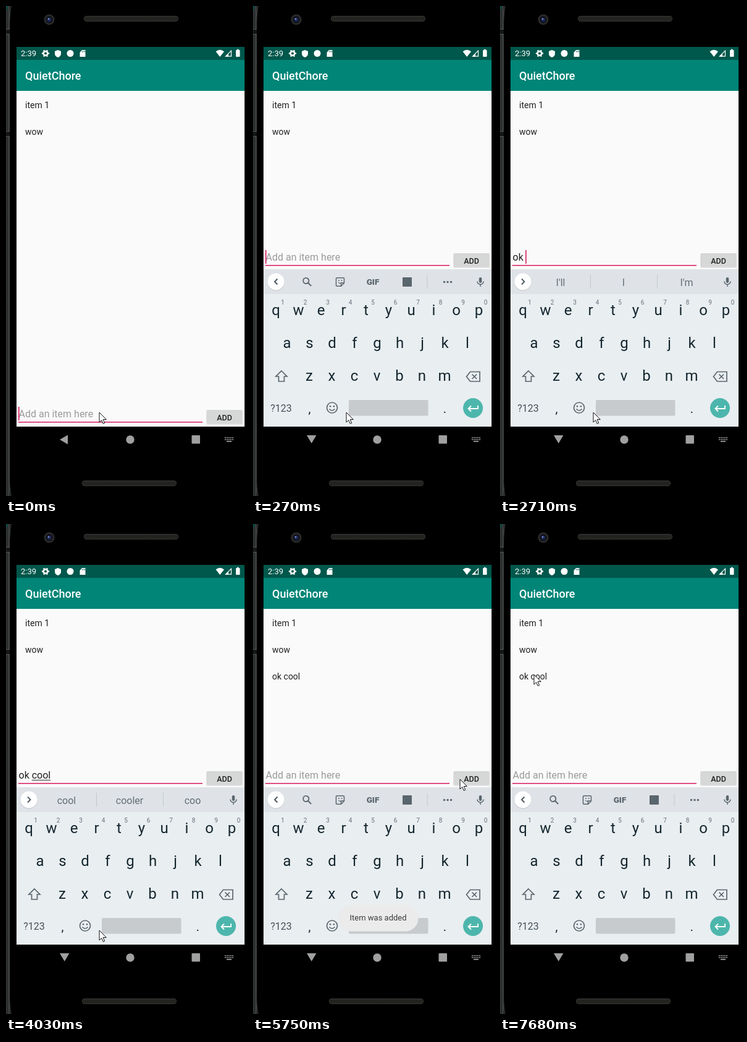
An HTML page with a canvas that plays this animation: 390 by 791 pixels, repeating every 8000 ms.

```html
<!DOCTYPE html>
<html lang="en">
<head>
<meta charset="utf-8">
<title>To-do app</title>
<style>
html, body { margin: 0; width: 100%; height: 100%; overflow: hidden; background: #000; }
canvas { display: block; }
</style>
</head>
<body>
<canvas id="stage" width="390" height="791"></canvas>
<script>
const ctx = document.getElementById('stage').getContext('2d');
const LOOP = 8000;
const INK = '#14262e', ICON = '#5a666d', PINK = '#d81b60';

// Value of the last [time, value] entry already reached.
const at = (track, t) => track.reduce((value, [start, next]) => t >= start ? next : value, track[0][1]);

// Each typing state: text, composing part, suggestions (none = tool row).
const TYPING = [
  [0, ['', '', null]],
  [2190, ['', 'o', ['o', 'of', 'on']]],
  [2460, ['', 'ok', ['ok', 'okay', 'oh']]],
  [2710, ['ok ', '', ["I'll", 'I', "I'm"]]],
  [3110, ['ok ', 'c', ['c', 'can', 'com']]],
  [3240, ['ok ', 'co', ['co', 'come', 'could']]],
  [3380, ['ok ', 'coo', ['coo', 'cool', 'cooking']]],
  [3660, ['ok ', 'cool', ['cool', 'cooler', 'coo']]],
  [5450, ['', '', null]]
];
const CARET = [[0, 1], [920, 0], [1350, 1], [1910, 0], [2190, 1], [4030, 0], [4460, 1], [4960, 0],
  [5450, 1], [5750, 0], [6150, 1], [6690, 0], [7260, 1], [7680, 0]];
const TOAST = [[0, 0], [5450, .35], [5600, .75], [5750, 1], [7260, .75], [7400, .5], [7540, .25], [7680, 0]];
const POINTER = [
  [0, [151, 656]], [4310, [165, 642]], [4460, [205, 592]], [4600, [252, 530]], [4720, [295, 470]],
  [4840, [322, 430]], [4960, [335, 412]], [6150, [300, 421]], [6290, [215, 395]], [6430, [130, 345]],
  [6560, [85, 312]], [6690, [63, 298]], [6830, [60, 280]], [6970, [57, 258]], [7110, [55, 243]]
];

function rect(x, y, w, h, color, radius = 0) {
  ctx.fillStyle = color;
  ctx.beginPath();
  ctx.roundRect(x, y, w, h, radius);
  ctx.fill();
}
function disc(x, y, r, color) {
  rect(x - r, y - r, 2 * r, 2 * r, color, r);
}
function fill(path, color) {
  ctx.fillStyle = color;
  ctx.fill(new Path2D(path));
}
function stroke(path, color, width = 1.6) {
  ctx.strokeStyle = color;
  ctx.lineWidth = width;
  ctx.stroke(new Path2D(path));
}
function ring(x, y, r, color, width) {
  stroke(`M${x - r} ${y}a${r} ${r} 0 1 0 ${2 * r} 0a${r} ${r} 0 1 0 ${-2 * r} 0`, color, width);
}
function text(string, x, y, size, color, align = 'left', weight = 400) {
  ctx.font = `${weight} ${size}px Roboto, sans-serif`;
  ctx.textAlign = align;
  ctx.fillStyle = color;
  ctx.fillText(string, x, y);
  return ctx.measureText(string).width;
}

function drawSpeaker(x, y) {
  rect(x, y, 153, 9, '#3a3a37', 4.5);
  rect(x + 1, y + 1, 151, 7, '#20201e', 3.5);
  for (let i = 4; i < 150; i += 3)
    for (let j = 2; j < 8; j += 3) rect(x + i, y + j, 1, 1, '#3b3a35');
}

function drawPhone() {
  rect(0, 0, 390, 791, '#000');
  const edge = ctx.createLinearGradient(0, 0, 9, 0);
  [[0, '#343737'], [.35, '#272929'], [.55, '#4b4e4e'], [.72, '#151616'], [1, '#000']]
    .forEach(([stop, color]) => edge.addColorStop(stop, color));
  fill('M0 0H9Q5 14 5 40V755Q5 780 9 791H0Z', edge);
  stroke('M8 0Q5.500 14 5.500 40V755Q5.500 780 8 791', '#454848', 1);
  fill('M0 0H4Q1 4 0 11Z', '#064d44');
  for (const y of [37, 202]) {
    rect(0, y, 6, 8, '#151616');
    rect(0, y, 6, 1, '#555858');
    rect(0, y + 8, 6, 1, '#555858');
  }
  disc(70, 22, 8.5, '#2c2c2c');
  disc(70, 22, 6, '#111319');
  disc(70, 22, 3.5, '#1c2550');
  disc(69, 21, 1.3, '#7c91d8');
  drawSpeaker(126, 16);
  drawSpeaker(123, 766);
}

function drawStatusBar() {
  rect(17, 66, 369, 21, '#00574b');
  text('2:39', 24, 81, 13, '#fff');
  ring(64, 76.5, 3.4, '#fff', 2.6);
  for (let i = 0; i < 6; i++) {
    const a = i * Math.PI / 3;
    disc(64 + 5 * Math.cos(a), 76.5 + 5 * Math.sin(a), 1.2, '#fff');
  }
  fill('M84 71l5 2v4q0 4-5 6q-5-2-5-6v-4Z', '#fff');
  disc(104, 76.5, 5.5, '#fff');
  fill('M123 71h5.500v11h-9V75Z', '#fff');
  for (const x of [123, 125, 127]) rect(x, 72.5, 1, 2, '#00574b');
  fill('M339.500 73.500Q346 68 353 73.500L346.200 82Z', '#fff');
  stroke('M355.500 81.200L364.500 72.200V81.200Z', '#fff', 1.2);
  fill('M355 81.700l5-5v5Z', '#fff');
  rect(372, 71, 6.5, 11, '#fff', 1);
  rect(374, 69.7, 2.5, 2, '#fff');
}

function drawApp(t) {
  rect(17, 87, 369, 592, '#fafafa');
  rect(17, 87, 369, 50, '#008577');
  text('QuietChore', 31, 119, 18, '#fff', 'left', 500);
  const items = t < 5450 ? ['item 1', 'wow'] : ['item 1', 'wow', 'ok cool'];
  items.forEach((item, i) => text(item, 31, 164.5 + 43 * i, 14, '#212121'));
}

function drawInput(t, top) {
  const [committed, composing] = at(TYPING, t);
  const base = top + 17;
  let x = 20.5;
  if (committed || composing) {
    x += text(committed, x, base, 16, '#212121');
    const width = text(composing, x, base, 16, '#212121');
    if (composing) rect(x, base + 2, width, 1, '#333');
    x += width;
  } else {
    text('Add an item here', x, base, 16, '#9b9b9b');
  }
  if (at(CARET, t)) rect(x - .5, top, 1.6, 22, PINK);
  rect(20, top + 24, 298, 1.4, PINK);

  const pressed = t >= 5210 && t < 5450;
  rect(324, top + 6, 59, 23, '#e6e6e6', 2);
  rect(324.5, top + 5, pressed ? 55 : 58, 22.5, pressed ? '#b9bab9' : '#d6d7d7', 2);
  text('ADD', 353.5, top + 22, 12.5, '#212121', 'center', 500);
}

function drawMic() {
  rect(365.800, 438, 4.400, 9, ICON, 2.2);
  stroke('M363 444.500a5 5 0 0 0 10 0M368 449.500v3.500', ICON, 1.5);
}

function drawToolRow() {
  ring(85.800, 443.500, 4.600, ICON, 1.8);
  stroke('M89.200 447l5 5', ICON, 2);
  stroke('M136 438.700h10q1.500 0 1.500 1.500v7l-5 5h-6.500q-1.500 0-1.500-1.500v-10.500q0-1.500 1.500-1.500ZM142.500 452v-5h5', ICON, 1.5);
  disc(139, 443, 1, ICON);
  disc(143.500, 443, 1, ICON);
  stroke('M138 446q2 2.500 4 1', ICON, 1.2);
  text('GIF', 194, 450, 13.5, ICON, 'center', 900);
  rect(242, 438, 15, 15, ICON, 1);
  rect(281.500, 435, 1, 21, '#c5cacf');
  for (const x of [309.500, 315, 320.500]) disc(x, 445.500, 1.7, ICON);
}

function drawSuggestions(words) {
  words.forEach((word, i) => text(word, 98 + 102 * i, 451.5, 16, '#646e75', 'center'));
  rect(146, 434, 1, 22, '#c3c8cc');
  rect(254, 434, 1, 22, '#c3c8cc');
}

function drawKeyboard(suggestions) {
  rect(17, 425, 369, 254, '#e9eef1');
  rect(17, 425, 369, 40, '#dfe3e7');
  disc(37, 446, 14, '#cdd2d6');
  disc(37, 445, 13.5, '#fff');
  stroke(suggestions ? 'M35 440.500l4.500 4.500l-4.500 4.500' : 'M39.500 440.500l-4.500 4.500l4.500 4.500', '#49545b', 1.8);
  if (suggestions) drawSuggestions(suggestions);
  else drawToolRow();
  drawMic();

  [['qwertyuiop', 37, 499], ['asdfghjkl', 55, 552], ['zxcvbnm', 91, 605]].forEach(([keys, x, y], row) => {
    [...keys].forEach((key, i) => {
      const center = x + 36.5 * i;
      text(key, center, y, 24, INK, 'center');
      if (row === 0) text((i + 1) % 10, center + 11, 482, 10, '#66727a', 'center');
    });
  });

  stroke('M46 589l9 9h-4.500v8h-9v-8H37Z', ICON, 1.7);
  stroke('M351.500 590.500h15.500v15.500h-15.500l-6-7.750ZM354.500 594.500l7.500 7.500M362 594.500l-7.500 7.500', ICON, 1.7);
  text('?123', 45.5, 654.5, 16, '#455158', 'center');
  text(',', 91.5, 657, 20, INK, 'center');
  ring(128, 648.500, 8.500, ICON, 1.7);
  disc(125, 646.300, 1.3, ICON);
  disc(131, 646.300, 1.3, ICON);
  stroke('M123.500 650.500q4.500 5 9 0', ICON, 1.6);
  rect(155, 636, 128.5, 25.5, '#c8cbce', 2);
  text('.', 310.5, 657, 20, INK, 'center');
  disc(356, 649, 16, '#4db6ac');
  stroke('M364 645v5h-15M353 645.500l-4.500 4.500l4.500 4.500', '#fff', 1.8);
}

function drawNavigation(open) {
  const color = '#a0a0a0';
  rect(17, 679, 369, 43, '#000');
  fill(open ? 'M87 693h15.500l-7.750 13Z' : 'M87 700l13-7.500v15Z', color);
  disc(201, 700, 6.700, color);
  rect(300.500, 693, 13.500, 13.500, color, 1);
  for (let i = 0; i < 5; i++)
    for (let j = 0; j < 2; j++) rect(354 + 3 * i, 696 + 3 * j, 1.8, 1.8, color);
  rect(357, 702, 8, 1.700, color);
}

function drawToast(alpha) {
  if (!alpha) return;
  ctx.globalAlpha = alpha;
  rect(137.500, 615, 130, 42.500, '#ebebeb', 21);
  text('Item was added', 156.5, 640, 13, '#3c3c3c');
  ctx.globalAlpha = 1;
}

function drawPointer([x, y]) {
  const arrow = new Path2D('M0 0V16L3.700 12.500L6.200 18.300L8.700 17.200L6.200 11.500H11.300Z');
  ctx.save();
  ctx.translate(x, y);
  ctx.fillStyle = '#fff';
  ctx.fill(arrow);
  ctx.strokeStyle = '#111';
  ctx.lineWidth = 1;
  ctx.stroke(arrow);
  ctx.restore();
}

function draw(t) {
  const open = t >= 150;
  drawPhone();
  drawStatusBar();
  drawApp(t);
  drawInput(t, open ? 394 : 647);
  if (open) {
    ctx.save();
    ctx.beginPath();
    ctx.rect(17, 425, 369, 254);
    ctx.clip();
    if (t < 270) {
      ctx.globalAlpha = .7;
      ctx.translate(0, 40);
    }
    drawKeyboard(at(TYPING, t)[2]);
    ctx.restore();
  }
  drawToast(at(TOAST, t));
  drawNavigation(open);
  drawPointer(at(POINTER, t));
}

const start = performance.now();
function tick() {
  draw((performance.now() - start) % LOOP);
  requestAnimationFrame(tick);
}
tick();
</script>
</body>
</html>
```
